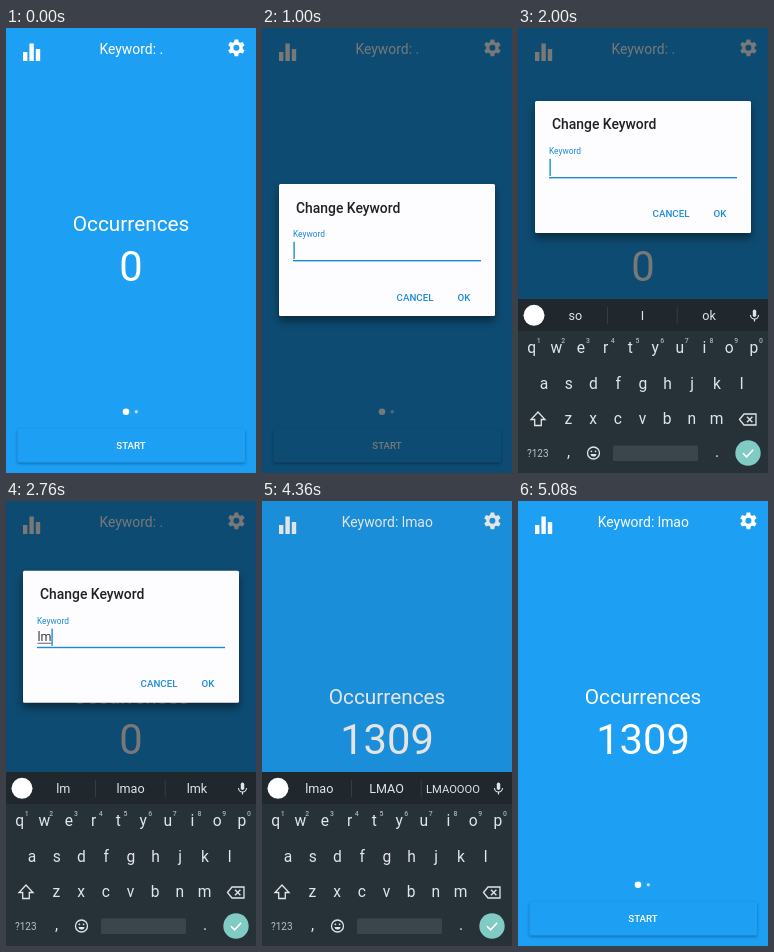
An HTML page with a canvas for the animation above (5120 ms loop, 250 px wide and 445 px high).

```html
<!DOCTYPE html>
<html lang="en">
<head>
<meta charset="utf-8">
<title>Keyword counter</title>
<style>
  html, body { margin: 0; width: 100%; height: 100%; overflow: hidden; background: #1d9ff3; }
  canvas { display: block; width: 100vw; height: 100vh; }
</style>
</head>
<body>
<canvas id="stage"></canvas>
<script>
const W = 250, H = 445, LOOP = 5120, STEP = 40;
const BLUE = '#1d9ff3', ACCENT = '#1b8bd6', KEY = '#e1e5e7';
const DIM = 0.53;
const KEYBOARD_TOP = 271;
const canvas = document.getElementById('stage');
const ctx = canvas.getContext('2d');
const ratio = window.devicePixelRatio || 1;
canvas.width = W * ratio;
canvas.height = H * ratio;

const TYPED = [
  { at: 960, text: '', hints: ['so', 'I', 'ok'] },
  { at: 2400, text: 'l', hints: ['l', 'lol', 'like'] },
  { at: 2640, text: 'lm', hints: ['lm', 'lmao', 'lmk'] },
  { at: 2880, text: 'lma', hints: ['lma', 'lmao', 'LMAO'] },
  { at: 3120, text: 'lmao', hints: ['lmao', 'LMAO', 'LMAOOOO'] }
];
const CONFIRMED = 4200;

const progress = (t, from, to) => Math.min(1, Math.max(0, (t - from) / (to - from)));
const easeOut = p => 1 - (1 - p) ** 3;
const easeIn = p => p * p;
const mix = (a, b, p) => a + (b - a) * p;

function text(str, x, y, size, color, align = 'center', weight = 400) {
  ctx.font = `${weight} ${size}px Roboto, sans-serif`;
  ctx.textAlign = align;
  ctx.fillStyle = color;
  ctx.fillText(str, x, y);
}

function rect(x, y, w, h, color) {
  ctx.fillStyle = color;
  ctx.fillRect(x, y, w, h);
}

function roundRect(x, y, w, h, r, color) {
  ctx.beginPath();
  ctx.roundRect(x, y, w, h, r);
  ctx.fillStyle = color;
  ctx.fill();
}

function disc(x, y, r, color) {
  ctx.beginPath();
  ctx.arc(x, y, r, 0, Math.PI * 2);
  ctx.fillStyle = color;
  ctx.fill();
}

function line(points, color, width, closed) {
  ctx.beginPath();
  points.forEach(([x, y]) => ctx.lineTo(x, y));
  if (closed) ctx.closePath();
  ctx.strokeStyle = color;
  ctx.lineWidth = width;
  ctx.stroke();
}

function withShadow(color, blur, dy, draw) {
  ctx.save();
  ctx.shadowColor = color;
  ctx.shadowBlur = blur * ratio;
  ctx.shadowOffsetY = dy * ratio;
  draw();
  ctx.restore();
}

function gear(x, y) {
  ctx.save();
  ctx.translate(x, y);
  ctx.fillStyle = '#fff';
  ctx.beginPath();
  ctx.arc(0, 0, 6.2, 0, Math.PI * 2);
  ctx.arc(0, 0, 3, 0, Math.PI * 2, true);
  ctx.fill();
  for (let i = 0; i < 6; i++) {
    ctx.beginPath();
    ctx.moveTo(-2.4, -5.2);
    ctx.lineTo(-1.8, -8.4);
    ctx.lineTo(1.8, -8.4);
    ctx.lineTo(2.4, -5.2);
    ctx.fill();
    ctx.rotate(Math.PI / 3);
  }
  ctx.restore();
}

function mainScreen(t) {
  const done = t >= CONFIRMED;
  rect(0, 0, W, H, BLUE);
  rect(17, 24, 4.4, 9, '#fff');
  rect(23.4, 15.5, 4.4, 17.5, '#fff');
  rect(29.8, 21, 4.4, 12, '#fff');
  gear(230.4, 19.8);
  text(done ? 'Keyword: lmao' : 'Keyword: .', 125.3, 26, 13.9, '#fff');
  text('Occurrences', 125, 203, 20.8, '#fff');
  text(done ? '1309' : '0', 125, 253, 41.7, '#fff');
  disc(120, 383.8, 3.3, '#fff');
  disc(130.3, 383.8, 1.7, '#b9def9');
  withShadow('rgba(0,30,70,.4)', 3, 1.2, () => roundRect(11.5, 401, 227.5, 33.5, 1.5, BLUE));
  text('START', 125, 421, 9.72, '#fff', 'center', 500);
}

function dialog(t, entry) {
  const shown = easeOut(progress(t, 800, 960));
  const alpha = shown * (1 - progress(t, CONFIRMED, 4320));
  if (alpha <= 0) return;
  const top = mix(156, 69.8, easeOut(progress(t, 1760, 2120)));
  const scale = mix(0.9, 1, shown);

  ctx.save();
  ctx.globalAlpha = alpha;
  ctx.translate(125, top + 66);
  ctx.scale(scale, scale);
  ctx.translate(-125, -66);
  withShadow('rgba(0,0,0,.45)', 9, 5, () => roundRect(17, 0, 216, 132, 1.5, '#fdfcfe'));
  text('Change Keyword', 34, 28.5, 13.9, '#202124', 'left', 500);
  text('Keyword', 31, 53.4, 8.33, ACCENT, 'left');
  text(entry.text, 31.5, 70.5, 12.5, '#3a3a3c', 'left');
  const width = ctx.measureText(entry.text).width;
  if (width) rect(31.5, 72, width, 0.8, '#3a3a3c');
  if (Math.floor((t - entry.at) / 500) % 2 === 0) {
    rect(31.4 + width, 57.8, 1.4, 17.2, ACCENT);
  }
  rect(31, 76, 188, 1.4, ACCENT);
  text('CANCEL', 153, 116.5, 9.72, ACCENT, 'center', 500);
  text('OK', 202, 116.5, 9.72, ACCENT, 'center', 500);
  ctx.restore();
}

function mic(x, y) {
  roundRect(x - 1.7, y - 6, 3.4, 7.5, 1.7, KEY);
  ctx.beginPath();
  ctx.arc(x, y - 0.5, 4, 0, Math.PI);
  ctx.strokeStyle = KEY;
  ctx.lineWidth = 1.1;
  ctx.stroke();
  rect(x - 0.6, y + 3.4, 1.2, 2.6, KEY);
}

function smiley(x, y) {
  ctx.beginPath();
  ctx.arc(x, y, 6, 0, Math.PI * 2);
  ctx.strokeStyle = KEY;
  ctx.lineWidth = 1.3;
  ctx.stroke();
  disc(x - 2.1, y - 1.7, 0.9, KEY);
  disc(x + 2.1, y - 1.7, 0.9, KEY);
  ctx.beginPath();
  ctx.arc(x, y + 0.6, 3, 0.1, Math.PI - 0.1);
  ctx.fillStyle = KEY;
  ctx.fill();
}

function keyRow(letters, x, y) {
  [...letters].forEach((c, i) => text(c, x + i * 24.7, y, 15.6, KEY));
}

function keyboard(t, hints) {
  const height = H - KEYBOARD_TOP;
  const hidden = 1 - easeOut(progress(t, 1700, 1920)) + easeIn(progress(t, 4440, 4640));
  if (hidden >= 1) return;
  ctx.save();
  ctx.translate(0, hidden * height);

  rect(0, KEYBOARD_TOP, W, height, '#263238');
  rect(0, KEYBOARD_TOP, W, 32, '#20282d');
  disc(16, 287.3, 10.5, '#fff');
  rect(89, 279, 0.8, 17, '#39434a');
  rect(158.8, 279, 0.8, 17, '#39434a');
  [57.3, 124.5, 191].forEach((x, i) => {
    text(hints[i], x, 292, hints[i].length > 6 ? 11.2 : 12.6, KEY);
  });
  mic(236.5, 287.5);

  keyRow('qwertyuiop', 13.6, 325);
  [...'1234567890'].forEach((c, i) => text(c, 20.6 + i * 24.7, 314.5, 6.9, '#aab2b6', 'center', 500));
  keyRow('asdfghjkl', 26, 360.5);
  keyRow('zxcvbnm', 50.4, 395.5);

  line([[20, 384], [27, 391.5], [23.3, 391.5], [23.3, 397.5],
        [16.7, 397.5], [16.7, 391.5], [13, 391.5]], KEY, 1.3, true);
  line([[221.5, 391.5], [226, 386], [238, 386], [238, 397], [226, 397]], KEY, 1.3, true);
  line([[229, 388.8], [234.4, 394.2]], KEY, 1.3);
  line([[234.4, 388.8], [229, 394.2]], KEY, 1.3);

  text('?123', 19.8, 429, 10, '#b9c0c4');
  text(',', 50.5, 429, 15.6, KEY);
  smiley(75.5, 425);
  roundRect(95, 417.5, 85, 15.5, 1.5, '#3b464c');
  text('.', 199, 429, 15.6, KEY);
  disc(230, 425, 12.7, '#80cbc4');
  line([[225, 425.3], [228.6, 428.8], [235.2, 421.8]], '#fff', 1.6);
  ctx.restore();
}

function draw(t) {
  ctx.setTransform(ratio, 0, 0, ratio, 0, 0);
  const entry = TYPED.filter(e => t >= e.at).pop() || TYPED[0];
  mainScreen(t);
  const dim = DIM * progress(t, 780, 960) * (1 - progress(t, CONFIRMED, 4400));
  rect(0, 0, W, H, `rgba(0,0,0,${dim})`);
  dialog(t, entry);
  keyboard(t, entry.hints);
}

const start = performance.now();
function tick() {
  const t = (performance.now() - start) % LOOP;
  draw(Math.floor(t / STEP) * STEP);
  requestAnimationFrame(tick);
}
tick();
</script>
</body>
</html>
```
